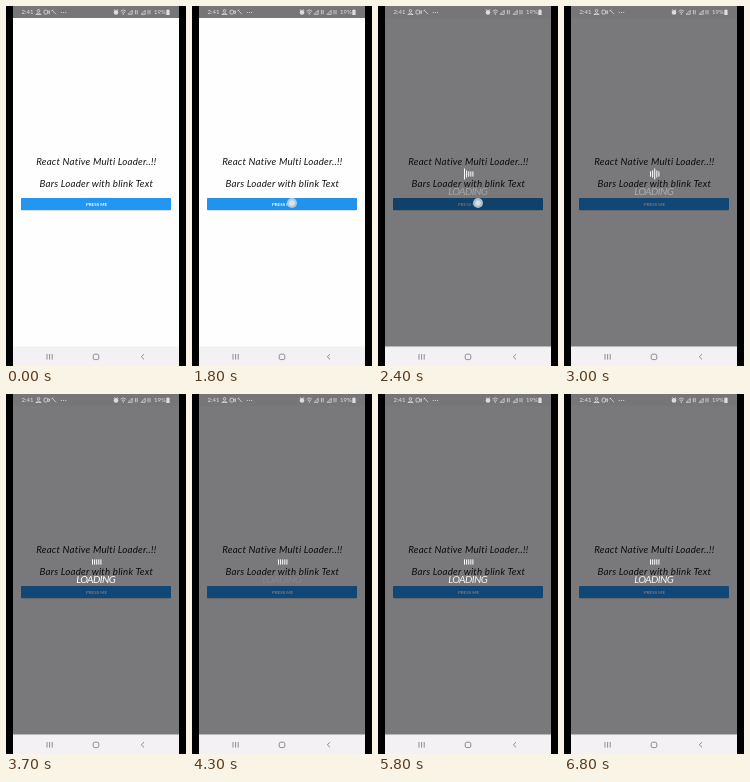
These frames come from a looping animation (180x360 px, 6900 ms). An HTML page:

```html
<!DOCTYPE html>
<html lang="en">
<head>
<meta charset="utf-8">
<title>Bars loader</title>
<style>
  html, body { margin: 0; width: 100%; height: 100%; overflow: hidden; background: #000; }
  svg { display: block; width: 100vw; height: 100vh; }
  text { font-family: Lato, "Open Sans", sans-serif; }
  .title { font-size: 9.75px; font-style: italic; letter-spacing: .2px; fill: #161616; text-anchor: middle; }
  .press { font-size: 4.5px; font-weight: 700; fill: #fff; text-anchor: middle; }
  .loading { font-size: 10.4px; font-style: italic; letter-spacing: -.6px; fill: #fff; text-anchor: middle; }
  .status text { font-size: 6px; fill: #e4e2e5; }
  .line { fill: none; stroke: #dddbde; stroke-width: .8; }
  .nav { fill: none; stroke: #858387; stroke-width: .9; }
</style>
</head>
<body>
<svg viewBox="0 0 180 360">
  <defs>
    <filter id="soft" x="-5%" y="-50%" width="110%" height="200%"><feGaussianBlur stdDeviation=".6"/></filter>
  </defs>
  <rect width="180" height="360" fill="#000"/>
  <rect x="7" width="166" height="12" fill="#777578"/>
  <rect x="7" y="12" width="166" height="329" fill="#fefefe"/>
  <rect x="7" y="340.5" width="166" height="19.5" fill="#f3f1f4"/>

  <g class="status">
    <text x="15.5" y="8.4">2:41</text>
    <g class="line">
      <circle cx="32.5" cy="4.8" r="1.3"/>
      <path d="M29.8 8.5q2.7-3 5.4 0z"/>
      <rect x="38" y="4.2" width="3.5" height="3.8" rx=".8"/>
      <path d="M41.8 5.7l1.6-1v3l-1.6-1M46 4l4 4.2M45.4 5.3l1.7-1.7"/>
      <path d="M107.8 4.3l1-1M112.2 4.3l-1-1"/>
      <path d="M114.6 5.2q2.7-2.6 5.4 0M115.7 6.6q1.6-1.4 3.2 0"/>
      <path d="M122.2 8.3h4v-4zM129.4 4v4.3M131.2 4v4.3M135.2 8.3h4v-4zM142 4v4.3M144 4v4.3"/>
    </g>
    <g fill="#dddbde">
      <circle cx="110" cy="6.4" r="2.3"/>
      <circle cx="117.3" cy="8" r=".7"/>
      <circle cx="55.3" cy="6.5" r=".6"/><circle cx="57.5" cy="6.5" r=".6"/><circle cx="59.7" cy="6.5" r=".6"/>
      <rect x="161.3" y="3.3" width="1.3" height="1"/>
      <rect x="160.3" y="4" width="3.3" height="5"/>
    </g>
    <text x="148" y="8.4">19%</text>
  </g>

  <text class="title" x="90.3" y="159.2">React Native Multi Loader..!!</text>
  <text class="title" x="90.3" y="180.8">Bars Loader with blink Text</text>

  <rect x="15.5" y="193.5" width="149" height="11" fill="#777" opacity=".5" filter="url(#soft)"/>
  <rect x="15" y="192" width="150" height="12" rx=".8" fill="#2196f3"/>
  <text class="press" x="90.5" y="199.7">PRESS ME</text>
  <rect id="ripple" x="15" y="192" width="150" height="12" rx=".8" fill="#000"/>

  <g id="modal">
    <rect x="7" y="12" width="166" height="328.5" fill="#030006" opacity=".525"/>
    <g id="bars" fill="#fff"></g>
    <text id="loading" class="loading" x="89.7" y="188.7">LOADING</text>
  </g>

  <g id="touch">
    <circle cx="100" cy="197" r="5" fill="#c4d2dc" opacity=".85"/>
    <circle cx="100" cy="197" r="2.8" fill="#e2e9ee" opacity=".8"/>
  </g>

  <g class="nav">
    <path d="M41 348v5.6M43.6 348v5.6M46.2 348v5.6"/>
    <rect x="87.2" y="348.2" width="5.6" height="5.4" rx="1.6"/>
    <path d="M138 348.2l-2.7 2.6 2.7 2.6"/>
  </g>
</svg>
<script>
  const LOOP = 6900, TICK = 100, PRESS = 1800, OPEN = 2400, RELEASE = 2500;
  const BAR_PERIOD = 500, BAR_LAG = 50, BAR_PULSE = 75, BLINK_PERIOD = 1000, BLINK_LOW = 210;
  const el = id => document.getElementById(id);
  const [modal, barGroup, loading, touch, ripple] =
    ["modal", "bars", "loading", "touch", "ripple"].map(el);

  const bars = Array.from({ length: 5 }, (_, i) => {
    const bar = document.createElementNS("http://www.w3.org/2000/svg", "rect");
    bar.setAttribute("x", 86 + i * 2.1);
    bar.setAttribute("width", 1);
    return barGroup.appendChild(bar);
  });

  function barHeight(time, i) {
    const phase = (time - i * BAR_LAG + BAR_PERIOD) % BAR_PERIOD;
    const gap = Math.min(phase, BAR_PERIOD - phase);
    return 5.2 + 5.8 * Math.max(0, 1 - gap / BAR_PULSE);
  }

  function draw(t) {
    const open = t >= OPEN, pressed = t >= PRESS && t < RELEASE;
    modal.style.display = open ? "" : "none";
    touch.style.display = pressed ? "" : "none";
    ripple.style.opacity = pressed ? 0.09 * Math.min(1, (t - PRESS + TICK) / 500) : 0;
    if (!open) return;
    bars.forEach((bar, i) => {
      const h = barHeight(t - OPEN, i);
      bar.setAttribute("y", 168 - h / 2);
      bar.setAttribute("height", h);
    });
    loading.style.opacity = (1 - Math.cos(2 * Math.PI * (t - BLINK_LOW) / BLINK_PERIOD)) / 2;
  }

  const start = performance.now();
  function frame() {
    const t = (performance.now() - start) % LOOP;
    draw(Math.floor(t / TICK) * TICK);
    requestAnimationFrame(frame);
  }
  frame();
</script>
</body>
</html>
```
